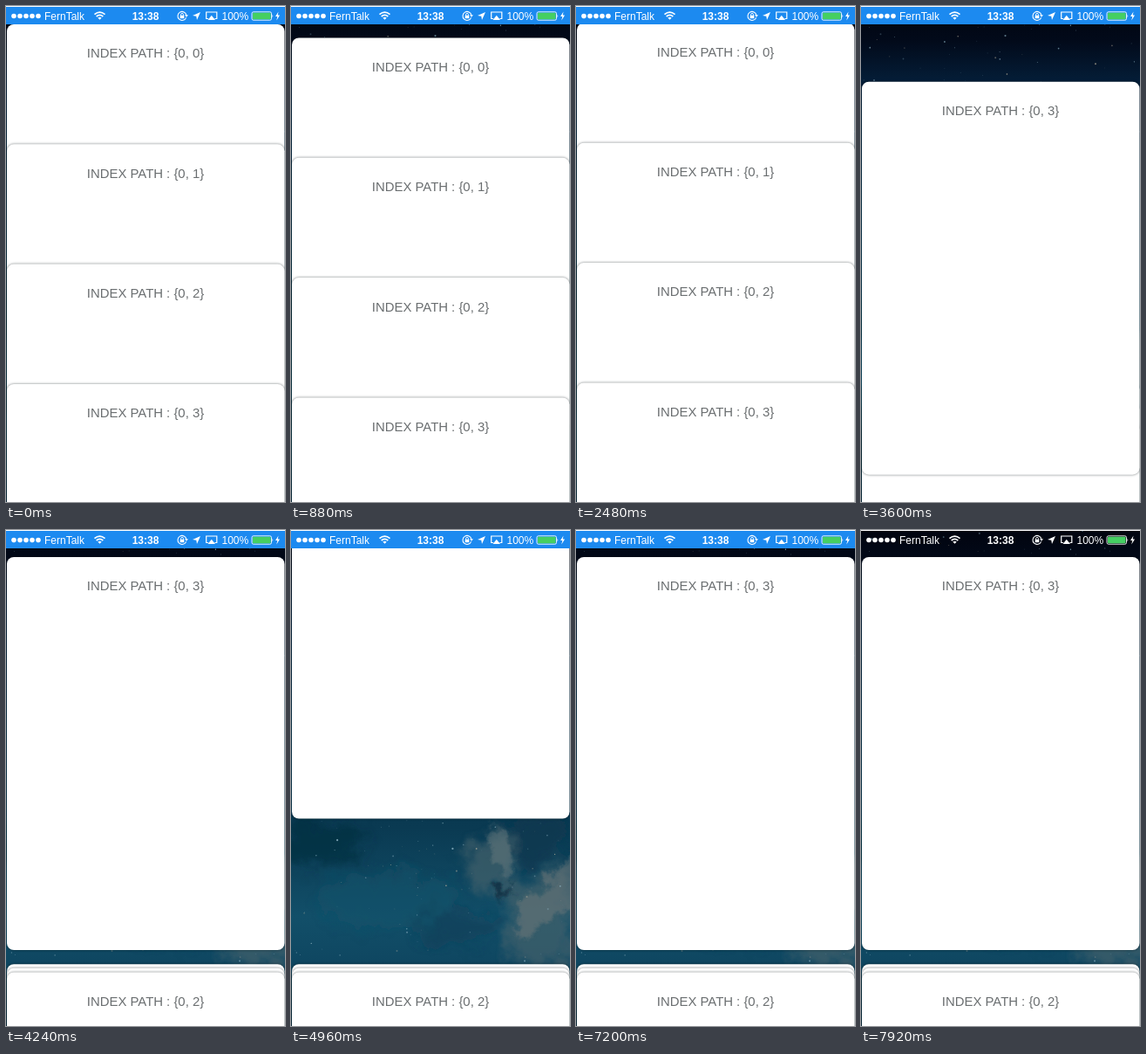
These frames come from a looping animation (320x568 px, 8 s). An HTML page:

```html
<!DOCTYPE html>
<html lang="en">
<head>
<meta charset="utf-8">
<title>Stacked cards</title>
<style>
  html, body { margin: 0; width: 100%; height: 100%; overflow: hidden; background: #020a1c; }
  svg { position: absolute; left: 0; top: 0; width: 320px; height: 568px; }
  #wallpaper { will-change: transform; }
  text { font-family: "Liberation Sans", Arial, sans-serif; }
  .card { filter: drop-shadow(0 .9px 1.4px rgba(0, 12, 16, .55)); }
  .card text { font-size: 14.9px; fill: #6a6e70; text-anchor: middle; }
  #status text { font-size: 12px; fill: #fff; }
</style>
</head>
<body>
<svg id="wallpaper" viewBox="0 0 320 568">
  <defs>
    <linearGradient id="sky" x1="0" y1="0" x2="0" y2="1">
      <stop offset="0" stop-color="#01040f"/>
      <stop offset=".07" stop-color="#020a1a"/>
      <stop offset=".15" stop-color="#041d37"/>
      <stop offset=".4" stop-color="#08314b"/>
      <stop offset=".6" stop-color="#0a3a52"/>
      <stop offset=".78" stop-color="#124f69"/>
      <stop offset="1" stop-color="#0a3b56"/>
    </linearGradient>
    <filter id="soft" x="-30%" y="-30%" width="160%" height="160%">
      <feGaussianBlur stdDeviation="7" result="blur"/>
      <feTurbulence type="fractalNoise" baseFrequency=".035" numOctaves="4" seed="5"/>
      <feDisplacementMap in="blur" scale="40" xChannelSelector="R" yChannelSelector="G"/>
    </filter>
    <filter id="cloud" x="-30%" y="-30%" width="160%" height="160%">
      <feGaussianBlur stdDeviation="2.5" result="blur"/>
      <feTurbulence type="fractalNoise" baseFrequency=".06" numOctaves="4" seed="8"/>
      <feDisplacementMap in="blur" scale="30" xChannelSelector="R" yChannelSelector="G"/>
    </filter>
  </defs>

  <rect width="320" height="568" fill="url(#sky)"/>
  <g filter="url(#soft)">
    <ellipse cx="30" cy="360" rx="55" ry="26" fill="#072f40" opacity=".7"/>
    <ellipse cx="285" cy="355" rx="35" ry="26" fill="#0a3850" opacity=".8"/>
    <ellipse cx="110" cy="425" rx="80" ry="32" fill="#16546c" opacity=".6"/>
    <ellipse cx="190" cy="455" rx="50" ry="20" fill="#0c4159" opacity=".7"/>
    <path d="M190 375L245 340L256 375L250 405L320 385V500H258L244 420L210 402Z" fill="#4a646d" opacity=".65"/>
  </g>
  <g filter="url(#cloud)">
    <path d="M232 338L246 346L258 374L250 396L238 392L226 360Z" fill="#64787d" opacity=".55"/>
    <path d="M330 372L300 392L288 418L256 424L262 470L290 450L330 430Z" fill="#747a7b" opacity=".5"/>
    <path d="M234 408L248 404L254 414L240 420Z" fill="#0a2d42" opacity=".85"/>
  </g>
  <g id="stars"></g>
</svg>

<svg viewBox="0 0 320 568">
  <g id="cards"></g>

  <g id="status">
    <rect id="bar" width="320" height="21" fill="#1c8af0"/>
    <rect width="320" height="1" fill="#fff"/>
    <g id="dots" fill="#fff"></g>
    <text x="44" y="15.5">FernTalk</text>
    <g fill="none" stroke="#fff" stroke-width="1.7">
      <path d="M101.5 9.6Q107.5 4.6 113.5 9.6"/>
      <path d="M103.7 12Q107.5 8.7 111.3 12"/>
    </g>
    <path d="M105.3 13.5Q107.5 11.8 109.7 13.5L107.5 15.8Z" fill="#fff"/>
    <text x="160" y="15.5" text-anchor="middle" font-weight="bold">13:38</text>
    <path d="M206.6 13.4A5 5 0 1 1 206.9 10.5" fill="none" stroke="#fff" stroke-width="1.1"/>
    <path d="M205 10.3H209L207 12.8Z" fill="#fff"/>
    <rect x="199.7" y="10.8" width="4.6" height="3.4" fill="#fff"/>
    <path d="M200.6 11V9.8A1.4 1.4 0 0 1 203.4 9.8V11" fill="none" stroke="#fff" stroke-width=".9"/>
    <path d="M223 7L219 16L218.3 11.7L214 11Z" fill="#fff"/>
    <path d="M232 14.5H229.7V7H241.8V14.5H239.5" fill="none" stroke="#fff" stroke-width="1.2"/>
    <path d="M235.75 10.8L240 16H231.5Z" fill="#fff"/>
    <text x="247.5" y="15.5">100%</text>
    <rect x="282" y="6.8" width="22.5" height="9.4" rx="1.8" fill="none" stroke="#fff" stroke-width=".9"/>
    <rect x="283" y="7.8" width="20.5" height="7.4" rx=".8" fill="#45cf62"/>
    <path d="M305.5 9.8Q307 11.5 305.5 13.2Z" fill="#fff"/>
    <path d="M312.5 6.5L309 12H311.3L310.3 16.5L314 10.6H311.7Z" fill="#fff"/>
  </g>
</svg>
<script>
const LOOP = 8000, GAP = 137.3, FIRST = 21, LAST = 3;
const BAR_OFF = 7600;
const $ = id => document.getElementById(id);

function add(parent, name, attrs, text = "") {
  const el = document.createElementNS("http://www.w3.org/2000/svg", name);
  for (const key in attrs) el.setAttribute(key, attrs[key]);
  el.textContent = text;
  parent.appendChild(el);
  return el;
}

function seeded(seed) {
  return () => (seed = seed * 16807 % 2147483647) / 2147483647;
}

// Eased value between neighbouring [time, value] keys
function track(t, keys) {
  if (t <= keys[0][0]) return keys[0][1];
  for (let i = 1; i < keys.length; i++) {
    const [t0, v0] = keys[i - 1], [t1, v1] = keys[i];
    if (t < t1) {
      const p = (t - t0) / (t1 - t0);
      return v0 + (v1 - v0) * p * p * (3 - 2 * p);
    }
  }
  return keys[keys.length - 1][1];
}

const rand = seeded(4127);
for (let i = 0; i < 320; i++) {
  add($("stars"), "circle", {
    cx: (rand() * 320).toFixed(1),
    cy: (rand() * 568).toFixed(1),
    r: (0.35 + 0.8 * rand() ** 3).toFixed(2),
    fill: rand() < 0.3 ? "#c9bda4" : "#8fb4c4",
    opacity: (0.25 + 0.6 * rand()).toFixed(2)
  });
}

for (let i = 0; i < 5; i++) add($("dots"), "circle", { cx: 9 + 7 * i, cy: 11.5, r: 2.8 });

const cards = [0, 1, 2, 3].map(i => {
  const g = add($("cards"), "g", { class: "card" });
  add(g, "rect", { x: 1, width: 318.5, height: 450, rx: 8, fill: "#fff" });
  add(g, "text", { x: 160, y: 38.4 }, `INDEX PATH : {0, ${i}}`);
  return g;
});

const pullKeys = [[160, 0], [1960, 44], [2480, -1.5], [2800, 0]];
const openKeys = [[3126, 0], [3746, 1]];
const dragKeys = [[4300, 0], [4960, -150.5], [5560, 0]];

function draw(t) {
  const pull = track(t, pullKeys), open = track(t, openKeys), drag = track(t, dragKeys);
  cards.forEach((card, i) => {
    const listY = FIRST + GAP * i + pull;
    const openY = i === LAST ? 31 + drag : 497.2 + 4.6 * i;
    const y = listY + (openY - listY) * open;
    card.setAttribute("transform", `translate(0 ${y.toFixed(2)})`);
  });
  $("bar").setAttribute("opacity", t < BAR_OFF ? 1 : 0);
}

const start = performance.now();
function tick() {
  draw((performance.now() - start) % LOOP);
  requestAnimationFrame(tick);
}
tick();
</script>
</body>
</html>
```
